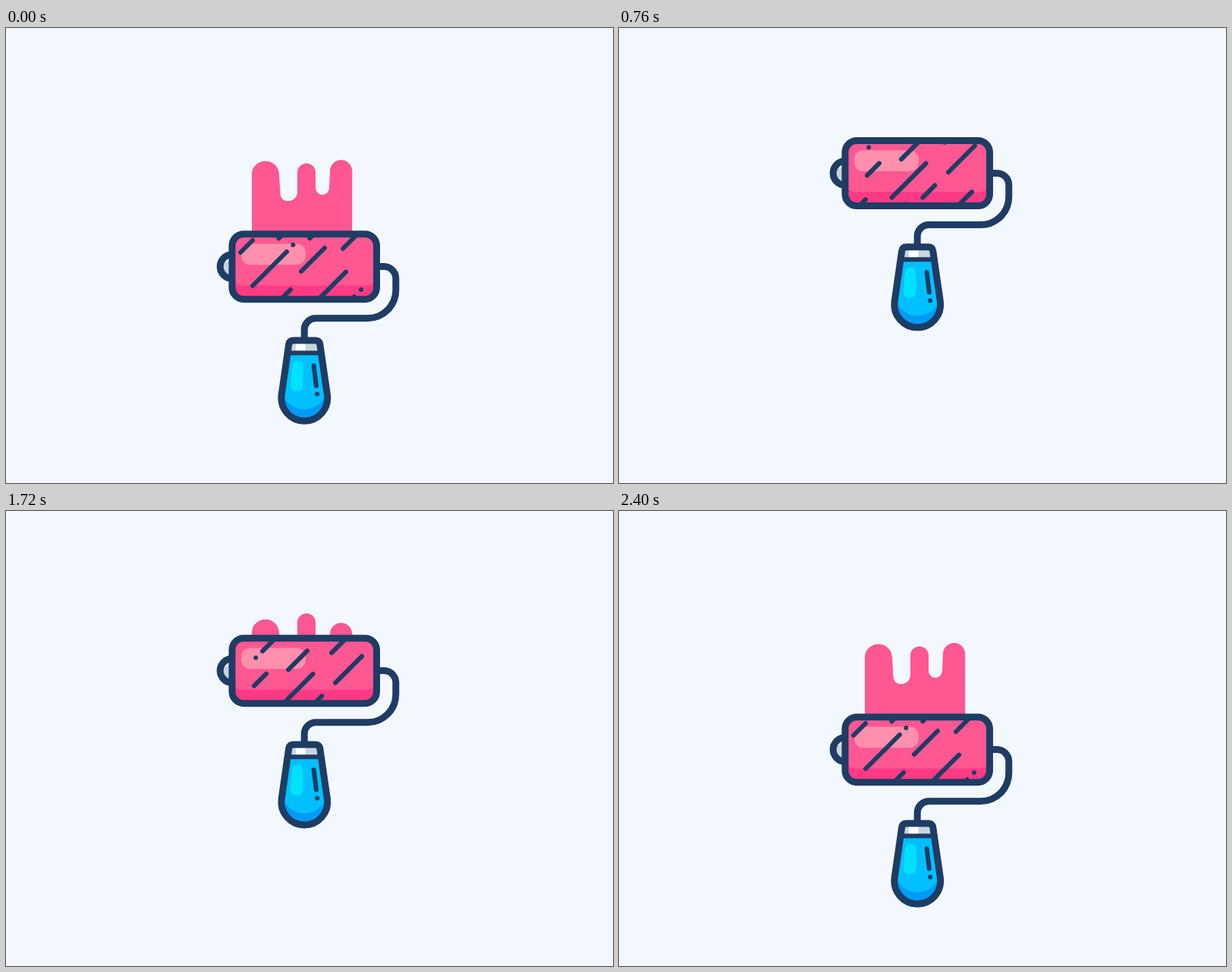
Animation of 800x600 px, one loop 2.44 s. Source, as an HTML page:

```html
<!DOCTYPE html>
<html lang="en">
<head>
<meta charset="utf-8">
<title>Paint roller</title>
<style>
html, body { margin: 0; width: 100%; height: 100%; overflow: hidden; background: #f3f8ff; }
svg { display: block; width: 100%; height: 100%; }
.ink { fill: none; stroke: #1e3c64; stroke-width: 9; stroke-linejoin: round; }
.mark { fill: none; stroke: #1e3c64; stroke-width: 6; stroke-linecap: round; }
</style>
</head>
<body>
<svg viewBox="0 0 800 600">
  <defs>
    <clipPath id="drum"><rect x="298" y="271.7" width="190.5" height="86" rx="15.5"/></clipPath>
    <path id="gripShape" d="M379 412H407.5Q412.9 412 413.8 417.2L423.4 483.5A30.4 30.4 0 1 1 363.2 483.5L372.7 417.2Q373.6 412 379 412Z"/>
    <clipPath id="grip"><use href="#gripShape"/></clipPath>
    <path id="marks" class="mark"/>
  </defs>
  <rect width="800" height="600" fill="#f3f8ff"/>
  <path id="paint" fill="#ff5792"/>
  <g id="tool">
    <path d="M298 298.8a15.8 15.8 0 0 0 0 31.6z" fill="#c7d3de"/>
    <path d="M298 298.8a15.8 15.8 0 0 0 -15.8 12Q288 309 298 307z" fill="#e9f0f7"/>
    <path class="ink" d="M299 298.8h-1a15.8 15.8 0 0 0 0 31.6h1"/>
    <path class="ink" d="M488 314.6H498a15.8 15.8 0 0 1 15.8 15.8V345.6A37.2 37.2 0 0 1 476.6 382.8H408.2A15 15 0 0 0 393.2 397.8V412"/>

    <g clip-path="url(#drum)">
      <rect x="298" y="271" width="191" height="87" fill="#ff3a85"/>
      <rect x="298" y="250" width="190.5" height="89.5" rx="13" fill="#ff5792"/>
      <rect x="310" y="284.5" width="85" height="27.7" rx="12" fill="#ff8fac"/>
      <g id="texture"></g>
    </g>
    <rect class="ink" x="298" y="271.7" width="190.5" height="86" rx="15.5"/>

    <g clip-path="url(#grip)">
      <rect x="355" y="405" width="76" height="120" fill="#009af7"/>
      <path d="M355 425H431V487.5H419.8A30.5 30.5 0 0 1 366.8 487.5H355Z" fill="#00c0ff"/>
      <path d="M384.3 439Q391.5 439 391.5 446.5V471Q391.5 479 383.4 479Q374.4 479 374.8 470L376.8 446.5Q377.5 439 384.3 439Z" fill="#00e1ff"/>
      <rect x="366" y="412" width="55" height="16" fill="#c9d5df"/>
      <rect x="382" y="412" width="12.5" height="16" fill="#fff"/>
      <path class="mark" d="M366 428.4H421"/>
    </g>
    <path class="mark" d="M405.6 445.2L408.9 471.8M410.1 482.8h.01"/>
    <use href="#gripShape" class="ink"/>
  </g>
</svg>
<script>
const $ = id => document.getElementById(id);
const LOOP = 2440, STEP = 40, HALF = 1200, LIFT = 165;
const SPIN = 0.895, WRAP = 179.6;

// Diagonal strokes: lower-left x, y and length along x; 0 makes a dot.
const strokes = [
  [325, 340, 45], [389, 321, 31], [444, 291, 21], [309, 296, 16],
  [378.3, 286, 0], [468, 345, 0], [415, 354.7, 33], [338, 382, 37],
  [429, 384.3, 30], [329.2, 390.6, 0], [372, 406.5, 25], [327, 427.8, 16],
  [434, 423.7, 35], [359.5, 457, 45], [400.3, 457, 16]
];
$('marks').setAttribute('d',
  strokes.map(([x, y, n]) => `M${x} ${y}l${n || 0.01} ${-n}`).join(''));
$('texture').innerHTML = [-WRAP, 0, WRAP]
  .map(y => `<use href="#marks" y="${y}"/>`).join('');

// Cubic bezier easing (.5, 0, .5, 1)
function ease(x) {
  let lo = 0, hi = 1;
  for (let i = 0; i < 30; i++) {
    const s = (lo + hi) / 2;
    if (1.5 * s * (1 - s) + s ** 3 < x) lo = s; else hi = s;
  }
  return lo * lo * (3 - 2 * lo);
}

// Drips sink steadily: sinking during the way up, fresh paint on the way down.
function paintPath(t, dy) {
  const up = t < HALF, u = up ? t : t - 2 * HALF;
  const at = (y, a, b) => y + u * (up ? a : b);
  const left = at(175.5, 0.0594, 0.0478);
  const mid = at(178.5, 0.0813, 0.064);
  const right = at(174, 0.0437, 0.039);
  const dip1 = at(228.3, 0.0813, 0.0633);
  const dip2 = at(220, 0.0594, 0.0475);
  const base = 315 + dy;
  return `M324 ${base}V${left + 17.5}` +
    `C324 ${left + 7.5} 332 ${left} 342 ${left}S359.6 ${left + 7.5} 360 ${left + 17.5}` +
    `L361.6 ${dip1 - 9}C362.1 ${dip1 - 3} 366.6 ${dip1} 372.2 ${dip1}` +
    `S384 ${dip1 - 5} 384 ${dip1 - 11.5}` +
    `V${mid + 12}A12 12 0 0 1 408 ${mid + 12}` +
    `V${dip2 - 9}A9 9 0 0 0 426 ${dip2 - 9}` +
    `L427 ${right + 14.6}A14.6 14.6 0 0 1 456.2 ${right + 14.6}V${base}Z`;
}

function draw(ms) {
  const t = Math.floor((ms % LOOP) / STEP) * STEP;
  const dy = -LIFT * ease(1 - Math.abs(t - HALF) / HALF);
  $('tool').setAttribute('transform', `translate(0 ${dy})`);
  $('texture').setAttribute('transform', `translate(0 ${dy * SPIN})`);
  const hidden = t > 600 && t < 1320;
  $('paint').setAttribute('d', hidden ? '' : paintPath(t, dy));
}

const start = performance.now();
function tick() {
  draw(performance.now() - start);
  requestAnimationFrame(tick);
}
tick();
</script>
</body>
</html>
```
